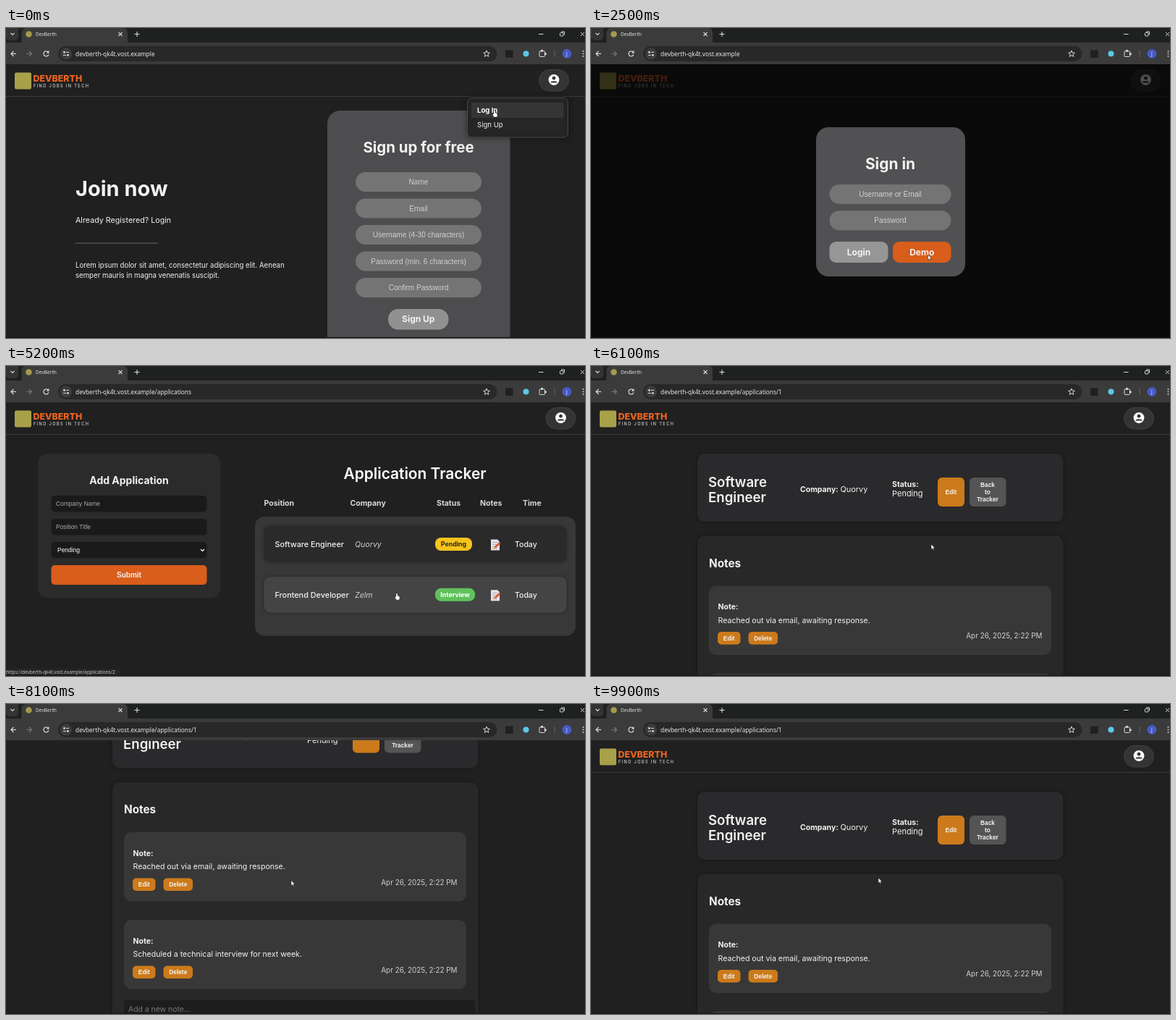
An HTML page with a canvas that plays this animation: 800x428 px, repeating every 10000 ms.

```html
<!DOCTYPE html>
<html lang="en">
<head>
<title>Job tracker demo</title>
<style>
html, body { margin: 0; width: 100%; height: 100%; overflow: hidden; background: #202020; }
canvas { display: block; width: 100vw; height: 100vh; }
</style>
</head>
<body>
<canvas id="stage" width="800" height="428"></canvas>
<script>
const ctx = document.getElementById('stage').getContext('2d');
const LOOP = 10000;
const HOST = 'devberth-qk4t.vost.example';
const SANS = 'Inter, sans-serif';
const ARIAL = '"Liberation Sans", sans-serif';
const UI = '"Noto Sans", sans-serif';
const ORANGE = '#d95d1b', AMBER = '#cc7a1b';
const T = { modal: 400, login: 2400, tracker: 2700, detail: 6000 };

// Pointer path: time, x, y of the hotspot
const PATH = [
  [0, 675, 114], [500, 675, 114], [1600, 465.5, 313], [2700, 465.5, 313],
  [3050, 430, 240], [3400, 354.5, 152], [3750, 354.5, 152], [4350, 440, 245],
  [4750, 480, 250], [5150, 540, 314], [5500, 540, 314], [5850, 470, 246],
  [6200, 470, 246], [7000, 438, 248], [7150, 438, 248], [7450, 394, 243.5],
  [9200, 394, 243.5], [9700, 397, 240], [LOOP, 397, 240]
];

const ease = (t, a, b) => {
  const p = Math.min(1, Math.max(0, (t - a) / (b - a)));
  return p * p * (3 - 2 * p);
};

function pointerAt(t) {
  const i = Math.max(1, PATH.findIndex(k => k[0] > t));
  const [a, ax, ay] = PATH[i - 1], [b, bx, by] = PATH[i];
  const p = ease(t, a, b);
  return { x: ax + (bx - ax) * p, y: ay + (by - ay) * p };
}

function hoveredRow(t) {
  if (t < T.tracker || t >= T.detail) return 0;
  const { x, y } = pointerAt(t);
  if (x < 357 || x > 774) return 0;
  return y >= 221 && y <= 271 ? 1 : y >= 291 && y <= 341 ? 2 : 0;
}

// The link bubble lingers briefly after the pointer leaves a row
function bubbleRow(t) {
  for (let back = 0; back <= 500; back += 50) {
    const row = hoveredRow(t - back);
    if (row) return row;
  }
  return 0;
}

function rect(x, y, w, h, fill) {
  ctx.fillStyle = fill;
  ctx.fillRect(x, y, w, h);
}

function box(x1, y1, x2, y2, r, fill, stroke) {
  ctx.beginPath();
  ctx.roundRect(x1, y1, x2 - x1, y2 - y1, r);
  if (fill) { ctx.fillStyle = fill; ctx.fill(); }
  if (stroke) { ctx.strokeStyle = stroke; ctx.lineWidth = 1; ctx.stroke(); }
}

function shadowBox(...args) {
  ctx.save();
  ctx.shadowColor = 'rgba(0,0,0,.35)';
  ctx.shadowBlur = 5;
  box(...args);
  ctx.restore();
}

function disc(x, y, r, fill) {
  ctx.beginPath();
  ctx.arc(x, y, r, 0, 7);
  ctx.fillStyle = fill;
  ctx.fill();
}

function line(color, width, ...pts) {
  ctx.beginPath();
  for (let i = 0; i < pts.length; i += 2) ctx.lineTo(pts[i], pts[i + 1]);
  ctx.strokeStyle = color;
  ctx.lineWidth = width;
  ctx.stroke();
}

function poly(fill, ...pts) {
  ctx.beginPath();
  for (let i = 0; i < pts.length; i += 2) ctx.lineTo(pts[i], pts[i + 1]);
  ctx.closePath();
  ctx.fillStyle = fill;
  ctx.fill();
}

function text(s, x, y, size, { color = '#f2f2f2', weight = 400, font = SANS, align = 'left', style = '', gap = 0 } = {}) {
  ctx.font = `${style} ${weight} ${size}px ${font}`;
  ctx.fillStyle = color;
  ctx.textAlign = align;
  ctx.letterSpacing = gap + 'px';
  ctx.fillText(s, x, y);
}

const bold = (s, x, y, size, opt) => text(s, x, y, size, { weight: 700, ...opt });

function button(label, x1, y1, x2, y2, r, fill, size, font = SANS) {
  box(x1, y1, x2, y2, r, fill);
  bold(label, (x1 + x2) / 2, (y1 + y2) / 2 + size * .35, size, { font, align: 'center' });
}

function pillInput(label, x1, y, x2) {
  box(x1, y, x2, y + 27, 13.5, '#747475');
  text(label, (x1 + x2) / 2, y + 17, 10.15, { font: ARIAL, color: '#d0d0d0', align: 'center' });
}

function drawBrowser(path) {
  const pale = '#d8d8d8';
  rect(0, 0, 800, 21, '#1f2020');
  rect(0, 20, 800, 30, '#3b3b3b');
  box(0, -8, 17, 17, 5, '#343434');
  line(pale, 1.2, 6.5, 7, 9, 9.5, 11.5, 7);
  box(21.5, 0, 168, 24, [6, 6, 0, 0], '#3b3b3b');
  disc(31.5, 8.5, 4.3, '#a39a4c');
  text('DevBerth', 41, 11, 6.6, { font: UI, color: '#e0e0e0' });
  line(pale, 1.1, 155.5, 6, 160.5, 11); line(pale, 1.1, 155.5, 11, 160.5, 6);
  line(pale, 1.1, 177.5, 8.5, 184.5, 8.5); line(pale, 1.1, 181, 5, 181, 12);
  line(pale, 1, 736, 8.5, 742.5, 8.5);
  box(765.5, 6.5, 770, 11, 1, null, pale);
  line(pale, 1, 767, 5, 771.5, 5, 771.5, 9.5);
  line(pale, 1, 794, 6, 799, 11); line(pale, 1, 794, 11, 799, 6);

  line(pale, 1.2, 14, 35.5, 7.5, 35.5); line(pale, 1.2, 10.5, 32, 7, 35.5, 10.5, 39);
  line('#777', 1.2, 28.5, 35.5, 35, 35.5); line('#777', 1.2, 32, 32, 35.5, 35.5, 32, 39);
  ctx.beginPath();
  ctx.arc(55.5, 35.5, 3.5, .3, 5.6);
  ctx.strokeStyle = pale; ctx.lineWidth = 1.2; ctx.stroke();
  poly(pale, 59.5, 31, 59.5, 34.8, 55.8, 34.8);

  box(72, 25, 678.5, 46, 10.5, '#282828');
  disc(83, 35.5, 8, '#3d3d3d');
  line(pale, 1, 83, 33.5, 87, 33.5); line(pale, 1, 79, 37.5, 83, 37.5);
  disc(80.5, 33.5, 1.4, pale); disc(85.5, 37.5, 1.4, pale);
  text(HOST + path, 96, 38.5, 8.35, { font: UI, color: '#e6e6e6' });

  ctx.beginPath();
  for (let i = 0; i < 10; i++) {
    const a = i * Math.PI / 5 - Math.PI / 2, r = i % 2 ? 2 : 4.6;
    ctx.lineTo(664 + r * Math.cos(a), 35.7 + r * Math.sin(a));
  }
  ctx.closePath();
  ctx.strokeStyle = pale; ctx.lineWidth = 1; ctx.stroke();
  box(690, 30.5, 700.5, 41, 1, '#202020');
  disc(718.5, 35.5, 4, '#5cc8e8');
  box(737, 32, 744.5, 39.5, 1, null, pale);
  disc(740.5, 31.4, 1.6, pale); disc(745.3, 35.8, 1.6, pale);
  line('#666', 1, 758, 31, 758, 40);
  disc(775, 35.5, 6.5, '#4659c4');
  text('J', 775, 38, 6.5, { font: UI, align: 'center' });
  for (let i = -1; i < 2; i++) disc(797.5, 35.5 + i * 3.5, .9, pale);
}

function drawHeader(shift) {
  rect(0, 94, 800, 1, '#3b3b3b');
  box(12, 61.5, 35, 84.5, 2, '#a9a04a');
  text('DEVBERTH', 37.5, 74, 12.4, { weight: 800, color: '#ef6420' });
  text('FIND JOBS IN TECH', 38, 82.3, 5.6, { weight: 500, color: '#cfcfcf', gap: 1.4 });
  const x = 736 + shift;
  box(x + .5, 57.5, x + 41.5, 87, 14.7, '#343435', '#414141');
  const cx = x + 21;
  disc(cx, 71.5, 7.4, '#fff');
  disc(cx, 69.2, 2.4, '#343435');
  ctx.beginPath();
  ctx.ellipse(cx, 75.6, 4.6, 2.3, 0, Math.PI, 0);
  ctx.fill();
}

function drawSignup() {
  bold('Join now', 96, 232, 29);
  text('Already Registered? Login', 96, 269, 10.7);
  rect(96, 296.5, 114, 1.2, '#58585a');
  text('Lorem ipsum dolor sit amet, consectetur adipiscing elit. Aenean', 96, 330.5, 9.64);
  text('semper mauris in magna venenatis suscipit.', 96, 345, 9.64);
  box(444, 114, 696.5, 450, 18, '#4d4d4f');
  bold('Sign up for free', 570, 171.5, 20.4, { align: 'center' });
  ['Name', 'Email', 'Username (4-30 characters)', 'Password (min. 6 characters)', 'Confirm Password']
    .forEach((label, i) => pillInput(label, 483, 199 + i * 36.5, 657));
  button('Sign Up', 528, 388, 611.5, 416.5, 14, '#919192', 12);
}

function drawMenu() {
  ctx.save();
  ctx.shadowColor = 'rgba(0,0,0,.5)';
  ctx.shadowBlur = 6;
  box(637.5, 96.5, 776.5, 151, 6, '#262627', '#4a4a4a');
  ctx.restore();
  box(643, 103, 770.5, 124, 2, '#353536');
  bold('Log In', 651, 117, 9.6, { color: '#fff' });
  text('Sign Up', 651, 137, 9.6);
}

function drawModal() {
  rect(0, 50, 800, 378, 'rgba(0,0,0,.7)');
  box(311, 137, 517, 343, 17, '#515153');
  bold('Sign in', 413.5, 195, 20.9, { align: 'center' });
  pillInput('Username or Email', 329.5, 216, 497.5);
  pillInput('Password', 329.5, 252.3, 497.5);
  button('Login', 329.5, 295, 410.5, 324, 9, '#969697', 12);
  button('Demo', 417, 295, 497.5, 324, 9, ORANGE, 12);
}

function drawMemo(x, y) {
  poly('#e6e3ec', x, y, x + 9, y, x + 12, y + 3, x + 12, y + 15, x, y + 15);
  for (let i = 0; i < 4; i++) line('#9a94aa', .7, x + 2, y + 4 + i * 2.8, x + 9, y + 4 + i * 2.8);
  line('#e0532f', 2.6, x + 12.5, y + 4.5, x + 5, y + 11.5);
  line('#f3a23a', 1.6, x + 6.3, y + 10.3, x + 4, y + 12.5);
}

function drawRow(y, hot, title, company, status, width, fill, ink) {
  shadowBox(356.5, y, 774.5, y + 50, 9, hot ? '#444445' : '#2a2a2b');
  text(title, 371.5, y + 29, 10.85, { weight: 500 });
  text(company, 482, y + 29, 10.6, { style: 'italic', color: '#d0d0d0' });
  box(593, y + 16, 593 + width, y + 34, 8, fill);
  bold(status, 593 + width / 2, y + 28.2, 8.8, { color: ink, align: 'center' });
  drawMemo(670, y + 18.5);
  text('Today', 703, y + 29, 10.5, { weight: 500 });
}

function drawTracker(t) {
  box(44, 121, 296.5, 320, 14, '#2b2b2c');
  bold('Add Application', 170, 163, 14, { align: 'center' });
  ['Company Name', 'Position Title', 'Pending'].forEach((label, i) => {
    const y = 179 + i * 31.9, select = i === 2;
    box(62.5, y, 277.5, y + 22.5, 5, '#1a1a1a');
    text(label, select ? 71 : 69, y + 14, 8.45, { font: ARIAL, color: select ? '#fff' : '#a9a9a9' });
  });
  line('#fff', 1.2, 269, 253, 271.5, 255.5, 274, 253);
  button('Submit', 62.5, 275, 277.5, 302, 5, ORANGE, 10, ARIAL);

  text('Application Tracker', 565, 156, 20.9, { weight: 600, align: 'center', color: '#fff' });
  [['Position', 356.5], ['Company', 475.5], ['Status', 595], ['Notes', 655], ['Time', 714]]
    .forEach(([label, x]) => bold(label, x, 193, 10.5, { color: '#d8d8d8' }));
  box(344, 208, 787, 372.5, 13, '#383838');
  const hot = hoveredRow(t);
  drawRow(221, hot === 1, 'Software Engineer', 'Quorvy', 'Pending', 51, '#f5c31c', '#2a2a2a');
  drawRow(290.7, hot === 2, 'Frontend Developer', 'Zelm', 'Interview', 55, '#5fc25c', '#fff');

  const row = bubbleRow(t);
  if (row) {
    box(-4, 418, 157, 432, 3, '#262626');
    text(`https://${HOST}/applications/${row}`, 0, 425, 6.4, { font: UI, color: '#c4c4c4' });
  }
}

function drawNote(y, body) {
  box(163, y, 636, y + 95.5, 10, '#383838');
  bold('Note:', 175.5, y + 32.5, 10.5);
  text(body, 175.5, y + 51, 10.6);
  button('Edit', 175, y + 63.5, 206.5, y + 81, 5, AMBER, 8.4, ARIAL);
  button('Delete', 217.5, y + 63.5, 258, y + 81, 5, AMBER, 8.4, ARIAL);
  text('Apr 26, 2025, 2:22 PM', 623.5, y + 72.5, 9.9, { color: '#d0d0d0', align: 'right' });
}

function drawDetail() {
  shadowBox(147, 121, 652.5, 215, 10, '#2a2a2c');
  text('Software', 162, 167, 18.6, { weight: 600 });
  text('Engineer', 162, 188.3, 18.6, { weight: 600 });
  bold('Company:', 289, 174, 10.5);
  text('Quorvy', 344.5, 174, 10.9);
  bold('Status:', 416, 167, 10.5);
  text('Pending', 416, 180, 11);
  button('Edit', 479, 154, 516, 194, 6, AMBER, 8.4, ARIAL);
  box(523, 154, 573.5, 194, 6, '#545455');
  ['Back', 'to', 'Tracker'].forEach((word, i) =>
    bold(word, 548, 166.7 + i * 10, 8.3, { font: ARIAL, align: 'center' }));

  shadowBox(147, 234.5, 652.5, 640, 10, '#282829');
  bold('Notes', 163, 277.5, 15.3);
  drawNote(303.5, 'Reached out via email, awaiting response.');
  drawNote(424.5, 'Scheduled a technical interview for next week.');
  box(163, 535.5, 648.5, 590, 4, '#1d1d1d');
  text('Add a new note...', 169, 551.5, 10.4, { color: '#787878' });
}

function drawPointer(t) {
  const { x, y } = pointerAt(t);
  ctx.save();
  ctx.translate(x, y);
  if (t < T.modal || hoveredRow(t)) {
    ctx.beginPath();
    ctx.roundRect(-.9, 0, 1.8, 6, .9);
    ctx.roundRect(-1.5, 3.4, 5.2, 5.4, 1.5);
    ctx.moveTo(-1, 8); ctx.lineTo(-2.8, 5); ctx.lineTo(-1, 5);
    ctx.strokeStyle = '#111'; ctx.lineWidth = .8; ctx.stroke();
    ctx.fillStyle = '#fff'; ctx.fill();
  } else {
    poly('#fff', 0, 0, 0, 7.2, 1.6, 5.8, 2.7, 8.2, 3.8, 7.7, 2.8, 5.4, 5, 5.2);
    ctx.strokeStyle = '#111'; ctx.lineWidth = .5; ctx.stroke();
  }
  ctx.restore();
}

function draw(t) {
  rect(0, 0, 800, 428, '#202020');
  if (t < T.tracker) {
    drawHeader(t < T.login ? 0 : 9.5);
    if (t < T.login) drawSignup();
    if (t < T.modal) drawMenu(); else drawModal();
  } else if (t < T.detail) {
    drawHeader(9.5);
    drawTracker(t);
  } else {
    const scroll = 126.5 * (ease(t, 7300, 7700) - ease(t, 9200, 9600));
    ctx.save();
    ctx.translate(0, -scroll);
    drawHeader(0);
    drawDetail();
    ctx.restore();
  }
  rect(0, 426.8, 800, 1.2, '#151515');
  drawBrowser(t < T.tracker ? '' : t < T.detail ? '/applications' : '/applications/1');
  drawPointer(t);
}

const start = performance.now();
function tick() {
  draw((performance.now() - start) % LOOP);
  requestAnimationFrame(tick);
}
tick();
</script>
</body>
</html>
```
